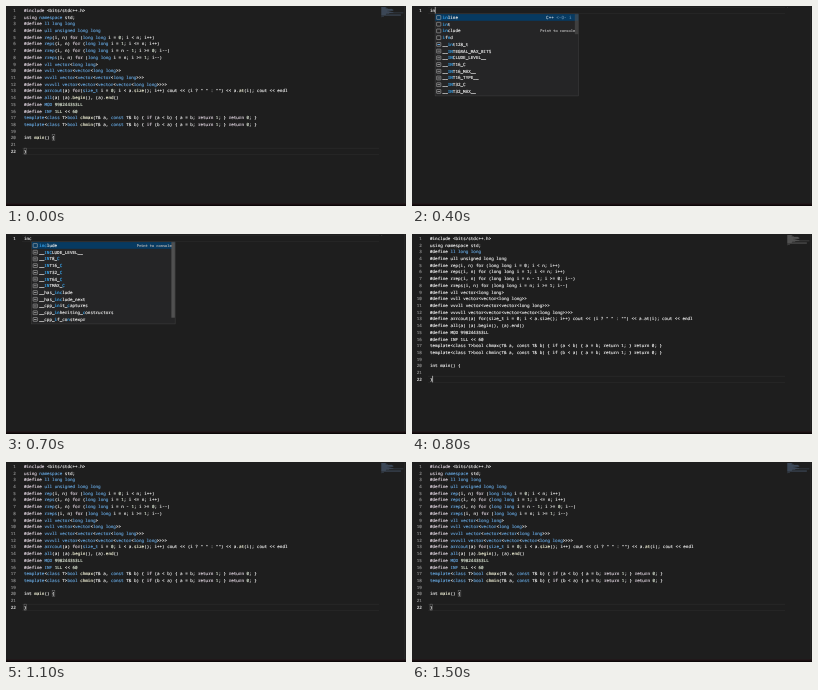
An HTML page for the animation above (2 s loop, 400 by 200 pixels).

```html
<!DOCTYPE html>
<html lang="en">
<head>
<meta charset="utf-8">
<title>Snippet expansion</title>
<style>
html, body { margin: 0; width: 100%; height: 100%; overflow: hidden; background: #1e1e1e; }
svg { display: block; width: 100%; height: 100%; }
text {
  font: 4.26px "Noto Sans Mono", "DejaVu Sans Mono", monospace;
  white-space: pre; text-rendering: geometricPrecision;
  color: #e6e6e6;
}
text, tspan { fill: currentColor; stroke: currentColor; stroke-width: 0.16px; }
</style>
</head>
<body>
<svg id="stage" viewBox="0 0 400 200"></svg>
<script>
const stage = document.getElementById('stage');
const LEFT = 18, CHAR = 2.556, LINE = 6.71, LOOP = 2000;
const BLUE = '#629fd4', PALE = '#d8cdd8';

const CODE = `#include <bits/stdc++.h>
using namespace std;
#define ll long long
#define ull unsigned long long
#define rep(i, n) for (long long i = 0; i < n; i++)
#define reps(i, n) for (long long i = 1; i <= n; i++)
#define rrep(i, n) for (long long i = n - 1; i >= 0; i--)
#define rreps(i, n) for (long long i = n; i >= 1; i--)
#define vll vector<long long>
#define vvll vector<vector<long long>>
#define vvvll vector<vector<vector<long long>>>
#define vvvvll vector<vector<vector<vector<long long>>>>
#define arrcout(a) for(size_t i = 0; i < a.size(); i++) cout << (i ? " " : "") << a.at(i); cout << endl
#define all(a) (a).begin(), (a).end()
#define MOD 998244353LL
#define INF 1LL << 60
template<class T>bool chmax(T& a, const T& b) { if (a < b) { a = b; return 1; } return 0; }
template<class T>bool chmin(T& a, const T& b) { if (b < a) { a = b; return 1; } return 0; }

int main() {

}`.split('\n');

const SUGGESTIONS = {
  in: ['inline', 'int', 'include', 'ifnd', '__int128_t', '__INTEGRAL_MAX_BITS', '__INCLUDE_LEVEL__',
    '__INT16_C', '__INT16_MAX__', '__INT16_TYPE__', '__INT32_C', '__INT32_MAX__'],
  inc: ['include', '__INCLUDE_LEVEL__', '__INT8_C', '__INT16_C', '__INT32_C', '__INT64_C', '__INTMAX_C',
    '__has_include', '__has_include_next', '__cpp_init_captures', '__cpp_inheriting_constructors',
    '__cpp_if_constexpr']
};

const SYNTAX = [
  [/^(#\w+|return|if|for|using)$/, PALE],
  [/^(long|unsigned|namespace|template|class|bool|const|v*ll|ull|vector|r?reps?|arrcout|all|size_t|MOD|INF)$/, BLUE],
  [/^(chmax|chmin|main|begin|end|size|at)$/, '#ececd2'],
  [/^\d/, '#d3ddcc']
];

function add(parent, tag, attrs = {}, content) {
  const node = document.createElementNS('http://www.w3.org/2000/svg', tag);
  for (const key in attrs) node.setAttribute(key, attrs[key]);
  if (content !== undefined) node.textContent = content;
  return parent.appendChild(node);
}
const rect = (parent, x, y, width, height, fill, extra) =>
  add(parent, 'rect', { x, y, width, height, fill, ...extra });
const label = (parent, x, y, content, style = '') => add(parent, 'text', { x, y, style }, content);
const baseline = row => 5.85 + row * LINE;

// Runs are [string, colour] pairs; an empty colour keeps the default.
function richText(parent, x, y, runs) {
  const line = label(parent, x, y);
  for (const [string, colour] of runs) add(line, 'tspan', { style: colour ? `color:${colour}` : '' }, string);
}

function lineNumber(parent, row, active) {
  label(parent, 9.8, baseline(row), row + 1, `text-anchor:end;color:${active ? '#d8d8d8' : '#8b8b8b'}`);
}

function activeLine(parent, row) {
  const top = 1 + row * LINE;
  for (const y of [top, top + 6.3]) rect(parent, 16, y, 357, 0.6, '#2b2b2b');
}

function caret(parent, row, column) {
  rect(parent, LEFT + column * CHAR - 0.3, 0.9 + row * LINE, 0.8, 6.6, '#bcbcbc');
}

function colourLine(line, row, coloured) {
  if (!coloured) {
    return row === 2 ? [['#define ', ''], ['ll long long', BLUE]] : [[line, '']];
  }
  return (line.match(/#?\w+|\s+|[^\w\s]/g) || []).map(token => {
    const rule = SYNTAX.find(([pattern]) => pattern.test(token));
    return [token, rule ? rule[1] : ''];
  });
}

function codeView(coloured) {
  const view = add(stage, 'g');
  const last = CODE.length - 1;
  activeLine(view, last);
  if (coloured) {
    for (const [row, column] of [[19, 11], [last, 0]]) {
      rect(view, LEFT + column * CHAR, 1.2 + row * LINE, CHAR + 0.2, 6, 'none', { stroke: '#858585', 'stroke-width': 0.4 });
    }
  } else caret(view, last, 1);
  CODE.forEach((line, row) => {
    lineNumber(view, row, row === last);
    richText(view, LEFT, baseline(row), colourLine(line, row, coloured));
    rect(view, 375.3, 1 + row * 0.48, line.length * 0.215, 0.36, coloured ? '#50647c' : '#747474');
  });
  return view;
}

// Marks the typed letters, contiguous if possible, otherwise in order.
function matchRuns(name, typed) {
  const lower = name.toLowerCase();
  const start = lower.indexOf(typed);
  let next = 0;
  return [...name].map((char, i) => {
    const hit = start >= 0 ? i >= start && i < start + typed.length : lower[i] === typed[next];
    if (hit) next++;
    return [char, hit ? '#38a2e8' : ''];
  });
}

function popup(view, typed) {
  const x = LEFT + typed.length * CHAR;
  const short = typed === 'in';
  rect(view, x, 7.9, 143.5, 82, '#252526', { stroke: '#414141', 'stroke-width': 0.5 });
  rect(view, x + 0.2, 8.1, 143, 6.7, '#073a61');
  rect(view, x + 139.7, 8.2, 3.5, short ? 20 : 75.5, '#505050', { opacity: short ? 0.6 : 1 });
  SUGGESTIONS[typed].forEach((name, row) => {
    const y = 11.5 + row * 6.72;
    const plain = row < (short ? 4 : 1);
    rect(view, x + 1.5, y - 1.9, 4.2, 3.8, 'none', { rx: 0.3, stroke: '#aaa', 'stroke-width': 0.6 });
    if (!plain) rect(view, x + 2.3, y - 0.4, 2.6, 0.8, row === 4 && short ? '#75beff' : '#aaa');
    richText(view, x + 7.5, y + 1.4, matchRuns(name, typed));
    if (name === 'include') label(view, x + 140, y + 1.3, 'Print to console', 'text-anchor:end;font-size:3.65px;color:#aaa');
  });
  if (short) richText(view, x + 111, 12.8, [['C++ ', '#b8c7d3'], ['<-O- i', '#5d87a8']]);
}

function typingView(typed, showCaret) {
  const view = add(stage, 'g');
  activeLine(view, 0);
  lineNumber(view, 0, true);
  label(view, LEFT, baseline(0), typed);
  if (typed) rect(view, 375.3, 1, typed.length * 0.3, 0.4, '#686868');
  if (SUGGESTIONS[typed]) popup(view, typed);
  if (showCaret) caret(view, 0, typed.length);
  return view;
}

rect(stage, 0, 0, 400, 200, '#1e1e1e');
rect(stage, 398, 0, 0.6, 197, '#2a2a2a');
rect(stage, 0, 197.6, 400, 1, '#260f15');
rect(stage, 0, 198.6, 400, 1.4, '#0c0708');

const finished = codeView(true);
const STEPS = [
  [0, finished],
  [100, typingView('', true)],
  [300, typingView('i', true)],
  [400, typingView('in', true)],
  [500, typingView('inc', false)],
  [800, codeView(false)],
  [900, finished]
];

const begin = performance.now();
function draw() {
  const time = (performance.now() - begin) % LOOP;
  const current = STEPS.filter(([start]) => start <= time).pop()[1];
  for (const [, view] of STEPS) view.style.display = view === current ? '' : 'none';
  requestAnimationFrame(draw);
}
draw();
</script>
</body>
</html>
```
